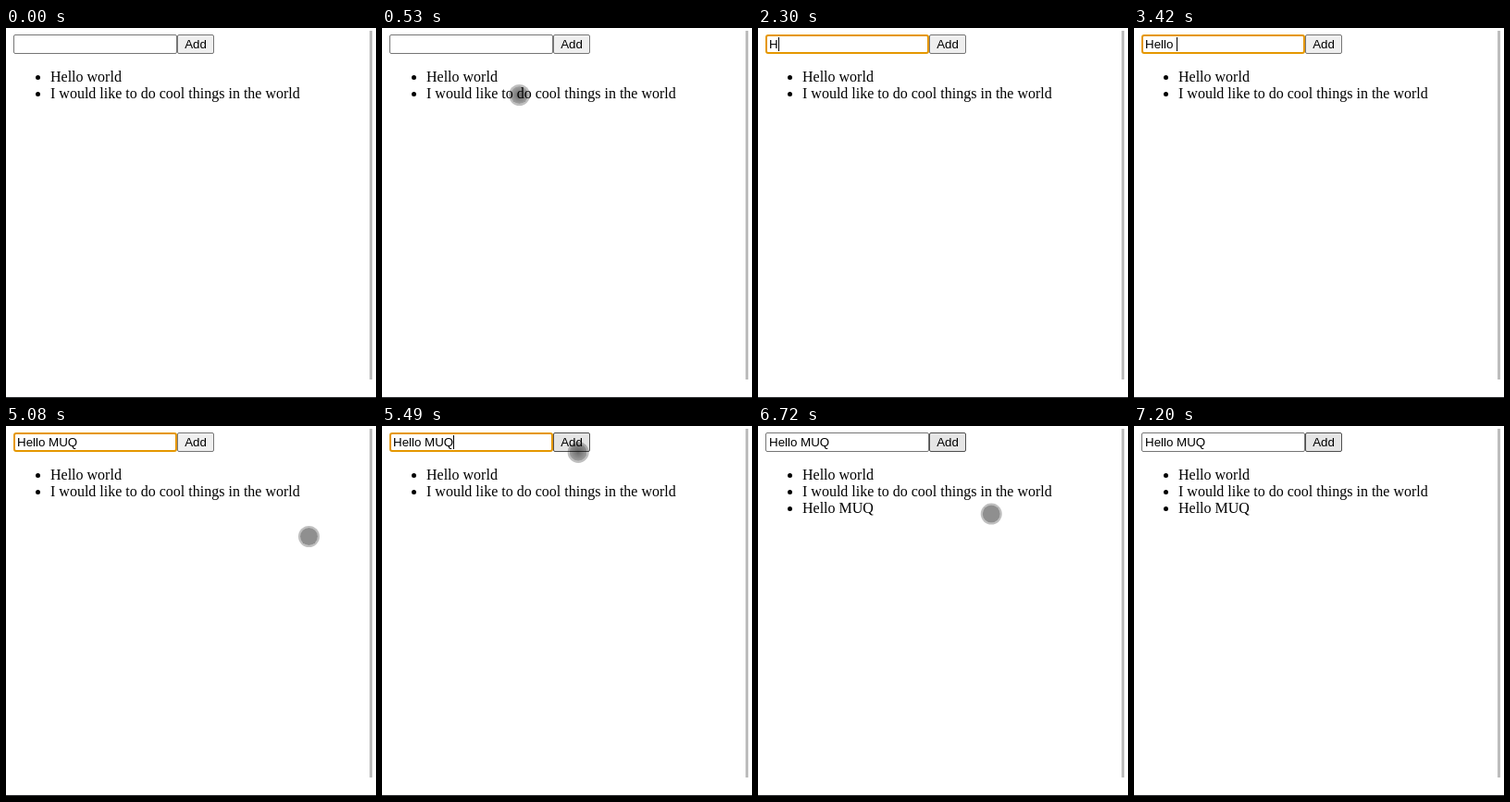
Recreate the animation shown at these times as an HTML page. Size 400x400 px, loop 7.53 s.

```html
<!DOCTYPE html>
<html lang="en">
<head>
<meta charset="utf-8">
<title>Add to list</title>
<style>
  html, body { margin: 0; width: 100%; height: 100%; overflow: hidden; background: #fff; }
  #stage { position: relative; width: 400px; height: 400px; overflow: hidden; background: #fff; color: #000; }
  #stage > * { position: absolute; box-sizing: border-box; }
  #field, #add { top: 7px; height: 21px; border: 1px solid #767676; border-radius: 2px; font: 13.333px/15px "Liberation Sans", Arial, sans-serif; white-space: pre; }
  #field { left: 8px; width: 177px; padding: 2px 3px; }
  #field.focus { padding: 1px 2px; border: 2px solid #e59700; border-radius: 3px; }
  #caret { display: inline-block; width: 1px; height: 15px; background: #000; vertical-align: top; }
  #add { left: 185px; width: 40px; padding-top: 2px; text-align: center; background: #efefef; }
  #add.hover { background: #e5e5e5; border-color: #4f4f4f; }
  #add.down { background: #f5f5f5; border-color: #8d8d8d; }
  ul { left: 0; top: 44px; width: 390px; margin: 0; padding: 0 0 0 48px; font: 16px/18px "Liberation Serif", "Times New Roman", serif; }
  #bar { left: 393px; top: 3px; width: 3px; height: 377px; background: #bdbdbd; }
  #edge { left: 0; top: 399px; width: 400px; height: 1px; background: #2b2c2f; }
  #touch { left: -11.5px; top: -11.5px; width: 23px; height: 23px; border-radius: 50%; border: 2.5px solid rgba(0,0,0,.25); background: rgba(0,0,0,.44) padding-box; }
  #touch.dark { background: radial-gradient(rgba(0,0,0,.58), rgba(0,0,0,.36) 75%) padding-box; }
</style>
</head>
<body>
<div id="stage">
  <div id="field"><span id="typed"></span><span id="caret"></span></div>
  <div id="add">Add</div>
  <ul>
    <li>Hello world</li>
    <li>I would like to do cool things in the world</li>
    <li id="item"></li>
  </ul>
  <div id="bar"></div>
  <div id="edge"></div>
  <div id="touch"></div>
</div>
<script>
const LOOP = 7530;
const FRAME = 1000 / 15;
const FOCUS = 1020, PRESS = 5840, ADDED = 5970, RELEASE = 6040;
const BLINK = 475;

const bursts = [
  { text: "Hello ", start: 2300, gap: 130 },
  { text: "MUQ", start: 3820, gap: 200 }
];

const linear = s => s;
const easeIn = k => s => s ** k;
const easeOut = k => s => 1 - (1 - s) ** k;

// Each stroke visits a few points; `at` counts frames from its start
const strokes = [
  { start: 70, end: 880, path: [
    { at: 0, x: 350, y: 396 },
    { at: 7, x: 148, y: 72, ease: easeOut(2.1) },
    { at: 11, x: 137, y: 22, ease: linear }] },
  { start: 880, end: 1230, path: [
    { at: 0, x: 137, y: 22 },
    { at: 3, x: 178, y: 110, ease: easeIn(2) },
    { at: 4, x: 321, y: 196, ease: linear }] },
  { start: 5080, end: 6440, path: [
    { at: 0, x: 327, y: 119 },
    { at: 10, x: 208, y: 25, ease: easeOut(3.8) }] },
  { start: 6440, end: 7200, path: [
    { at: 0, x: 208, y: 25 },
    { at: 7, x: 342, y: 238, ease: easeIn(2) },
    { at: 10, x: 399, y: 386, ease: easeOut(1.9) }] }
];

const [field, typed, caret, add, item, touch] =
  ["field", "typed", "caret", "add", "item", "touch"].map(id => document.getElementById(id));
item.textContent = bursts.map(b => b.text).join("");

const within = (t, a, b) => t >= a && t < b;
const show = (el, on) => { el.style.visibility = on ? "visible" : "hidden"; };

function pointerAt(t) {
  const stroke = strokes.find(s => within(t, s.start, s.end));
  if (!stroke) return null;
  const { path } = stroke;
  const frame = Math.min(path.at(-1).at, Math.floor((t - stroke.start + 12) / FRAME));
  const i = Math.max(1, path.findIndex(p => p.at >= frame));
  const from = path[i - 1], to = path[i];
  const e = to.ease((frame - from.at) / (to.at - from.at));
  return { x: from.x + (to.x - from.x) * e, y: from.y + (to.y - from.y) * e };
}

// Text typed so far and the time of the last key, which restarts the caret's blink
function typingAt(t) {
  let text = "", last = FOCUS;
  for (const b of bursts) {
    if (t < b.start) break;
    const count = Math.min(b.text.length, 1 + Math.floor((t - b.start) / b.gap));
    text += b.text.slice(0, count);
    last = b.start + (count - 1) * b.gap;
  }
  return { text, last };
}

function draw(t) {
  const { text, last } = typingAt(t);
  const focused = within(t, FOCUS, PRESS);
  typed.textContent = text;
  field.className = focused ? "focus" : "";
  show(caret, focused && Math.floor((t - last) / BLINK) % 2 === 0);
  show(item, t >= ADDED);

  const p = pointerAt(t);
  const over = p && within(p.x, 185, 225) && within(p.y, 7, 28);
  add.className = within(t, PRESS, RELEASE) ? "down" : over || t >= RELEASE ? "hover" : "";

  show(touch, p);
  if (p) {
    touch.style.transform = `translate(${p.x}px, ${p.y}px)`;
    touch.className = p.y < 80 ? "dark" : "";
  }
}

const begin = performance.now();
function tick() {
  draw((performance.now() - begin) % LOOP);
  requestAnimationFrame(tick);
}
draw(0);
requestAnimationFrame(tick);
</script>
</body>
</html>
```
